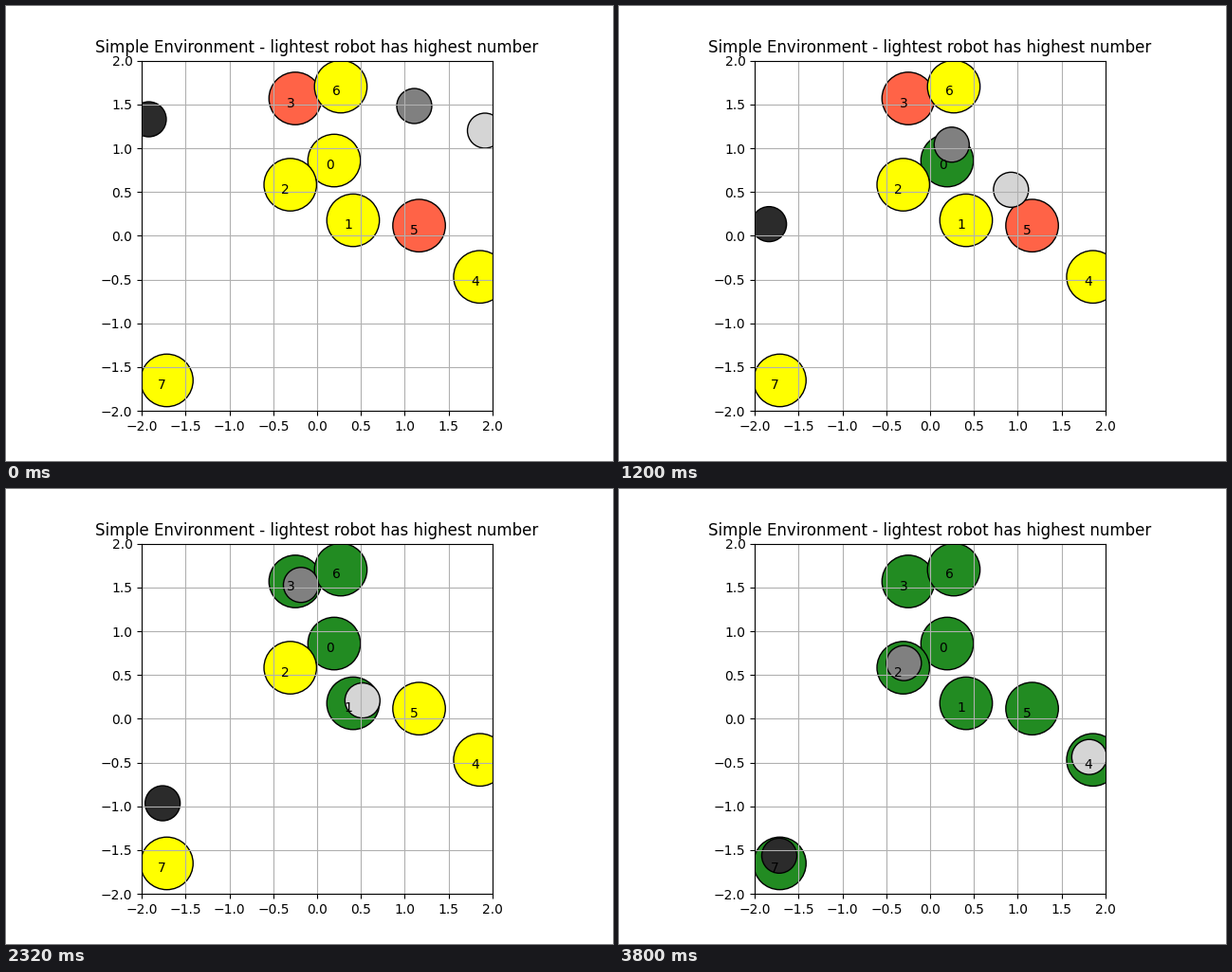
Animation of 640 by 480 pixels, one loop 3.84 s. Source, as a matplotlib script:

```python
import numpy as np
import matplotlib.pyplot as plt
from matplotlib.animation import FuncAnimation
from matplotlib.patches import Circle

FRAMES, INTERVAL = 96, 40
SPEED, REACH = 0.05, 0.1

TASKS = np.array([
    (0.195, 0.859), (0.411, 0.177), (-0.306, 0.583), (-0.249, 1.568),
    (1.858, -0.469), (1.164, 0.116), (0.270, 1.703), (-1.715, -1.651),
])
NEEDS = {3: 1, 5: 3}  # task -> task that must be finished first
STARTS = np.array([(-1.921, 1.330), (1.109, 1.4816), (1.9156, 1.2002)])
ROUTES = [[7], [0, 6, 3, 2], [1, 5, 4]]
SHADES = [1 / 6, 1 / 2, 5 / 6]


def is_open(task, done):
    return task not in NEEDS or NEEDS[task] in done


def simulate(steps):
    """Robot positions and finished tasks after each step."""
    pos = STARTS.copy()
    legs = [0] * len(ROUTES)
    done = frozenset()
    history = [(pos.copy(), done)]
    for _ in range(steps):
        finished = set(done)
        for i, route in enumerate(ROUTES):
            if legs[i] == len(route) or not is_open(route[legs[i]], done):
                continue
            task = route[legs[i]]
            gap = TASKS[task] - pos[i]
            pos[i] += SPEED * gap / np.hypot(*gap)
            if np.hypot(*(TASKS[task] - pos[i])) < REACH:
                finished.add(task)
                legs[i] += 1
        done = frozenset(finished)
        history.append((pos.copy(), done))
    return history


def step_at(frame):
    # the simulation runs at 50 ms per step
    return (4 * frame + 1) // 5


def task_color(task, done):
    if task in done:
        return "forestgreen"
    return "yellow" if is_open(task, done) else "tomato"


history = simulate(step_at(FRAMES - 1))

fig, ax = plt.subplots(figsize=(6.4, 4.8), dpi=100)
ax.set_aspect("equal")
ax.set(xlim=(-2, 2), ylim=(-2, 2))
ticks = np.arange(-2, 2.1, 0.5)
ax.set_xticks(ticks)
ax.set_yticks(ticks)
ax.grid(True)
ax.set_title("Simple Environment - lightest robot has highest number")


def add_circle(center, radius, color):
    return ax.add_patch(Circle(center, radius, facecolor=color, edgecolor="black"))


spots = [add_circle(xy, 0.3, "yellow") for xy in TASKS]
robots = [add_circle(xy, 0.2, str(s)) for xy, s in zip(STARTS, SHADES)]
for n, (x, y) in enumerate(TASKS):
    ax.text(x - 0.1, y - 0.1, str(n))


def draw(frame):
    pos, done = history[step_at(frame)]
    for robot, xy in zip(robots, pos):
        robot.center = xy
    for task, spot in enumerate(spots):
        spot.set_facecolor(task_color(task, done))
    return spots + robots


anim = FuncAnimation(fig, draw, frames=FRAMES, interval=INTERVAL,
                     repeat=True, repeat_delay=0, blit=False)
plt.show()
```
